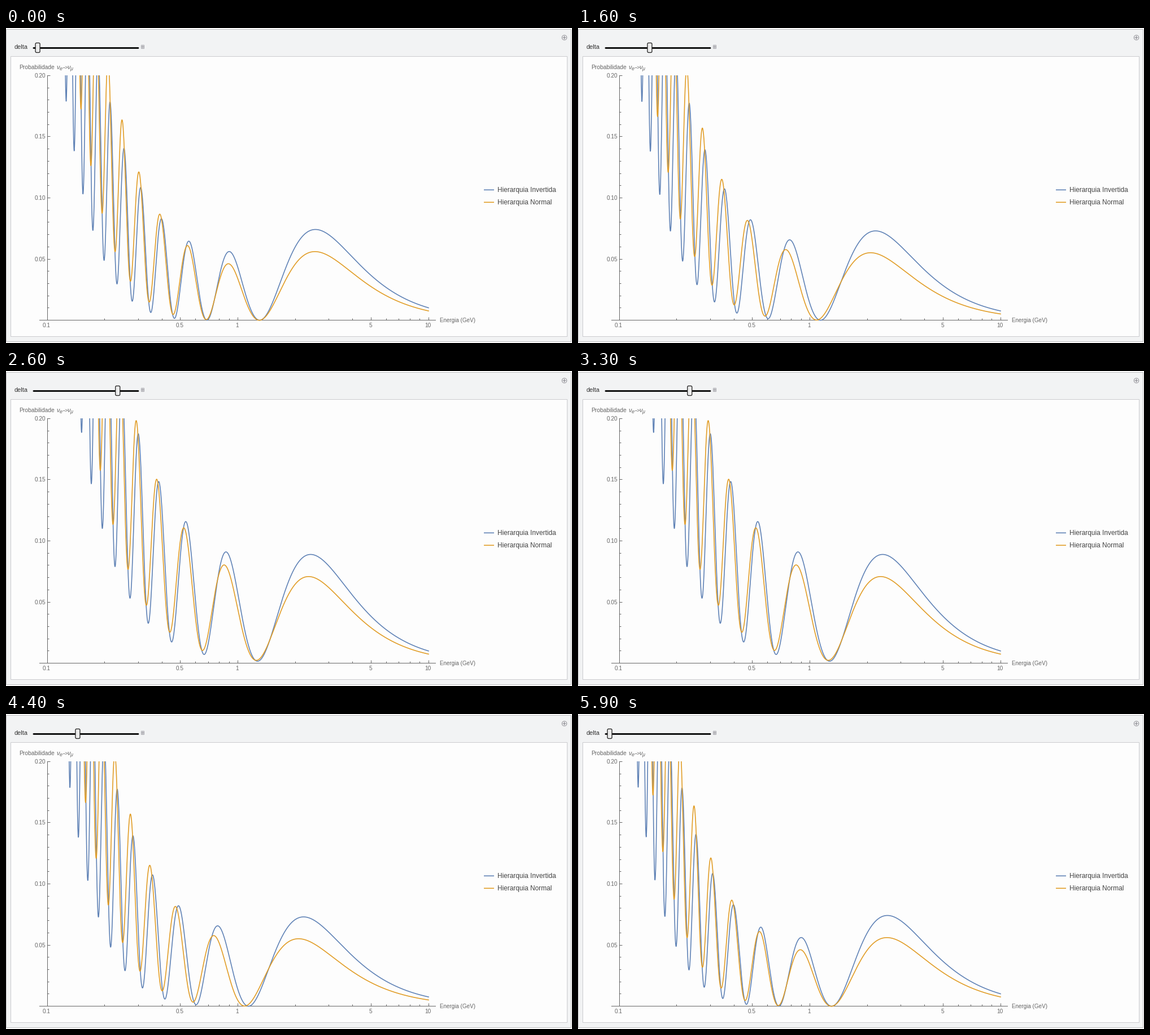
Write a matplotlib script that moves like this. It is 1002 by 559 pixels and loops after 6 s.

```python
import numpy as np
import matplotlib.pyplot as plt
from matplotlib.animation import FuncAnimation
from matplotlib.collections import LineCollection
from matplotlib.patches import Circle, FancyBboxPatch, Rectangle

W, H, DPI = 1002, 559, 64
PT = 72 / DPI                    # points per pixel
FRAMES, INTERVAL = 60, 100
STEPS = 12                       # slider steps of pi/6

X0, DECADE = 73, 337.5           # x of 0.1 GeV, pixels per decade
Y0, YSCALE, TOP = 518.7, 2172, 84
THUMB_X, TRAVEL = 52.1, 170
BLUE, ORANGE, GREY = "#5e81b5", "#e19c24", "#666666"

plt.rcParams["font.family"] = "Liberation Sans"
plt.rcParams["path.snap"] = False
fig = plt.figure(figsize=(W / DPI, H / DPI), dpi=DPI, facecolor="white")
ax = fig.add_axes([0, 0, 1, 1])
ax.set(xlim=(0, W), ylim=(H, 0))
ax.axis("off")


def px(energy):
    return X0 + DECADE * np.log10(energy / 0.1)


def py(prob):
    return Y0 - YSCALE * prob


def crisp(v):
    """Centre of the pixel that holds v."""
    return np.floor(v) + 0.5


def text(x, y, s, size=10, color=GREY, ha="left", va="baseline", **kw):
    ax.text(x, y, s, fontsize=size * PT, color=color, ha=ha, va=va, **kw)


def line(x, y, color, width, **kw):
    return ax.plot(x, y, color=color, lw=width * PT, **kw)[0]


def box(x, y, w, h, face, edge):
    ax.add_patch(Rectangle((x, y), w, h, fc=face, ec=edge, lw=PT))


# Panels
box(0.5, 2.5, 1000, 554, "#f2f3f4", "#bcbcbe")
box(8.5, 50.5, 985, 497, "#fdfdfd", "#cbcbce")

# Slider and small buttons
text(14.6, 37.3, "delta", 11, "#333333")
line([49, 234], [35.5, 35.5], "#111111", 3, solid_capstyle="round")
box(239.5, 30.5, 5, 6, "#f4f4f6", "#a8a8ae")
line([240, 244], [33.5, 33.5], "#8c8c92", 1)
line([242, 242], [31.5, 35.5], "#8c8c92", 1)
ax.add_patch(Circle((988.5, 17), 4.3, fc="#f4f4f6", ec="#99999e", lw=PT))
line([986, 991], [17, 17], "#8c8c92", 1.2)
line([988.5, 988.5], [14.5, 19.5], "#8c8c92", 1.2)

thumb = FancyBboxPatch((THUMB_X, 26.5), 8, 17,
                       boxstyle="round,pad=0,rounding_size=2",
                       fc="#ececec", ec="#222222", lw=1.3 * PT, zorder=4)
ax.add_patch(thumb)

# Axes
left, base = crisp(X0), crisp(Y0)
segs = [[(59, base), (761, base)], [(left, TOP), (left, base)]]
for i in range(1, 21):
    y = crisp(py(i / 100))
    segs.append([(left, y), (left + (5 if i % 5 == 0 else 3), y)])
    if i % 5 == 0:
        text(70, y - 0.3, f"{i / 100:.2f}", ha="right", va="center_baseline")
majors = (0.1, 0.5, 1, 5, 10)
for e in [m * d for d in (0.1, 1) for m in range(1, 10)] + [10]:
    big = any(np.isclose(e, m) for m in majors)
    x = crisp(px(e))
    segs.append([(x, base), (x, base - (5 if big else 3))])
for e in majors:
    text(px(e) - 1, 531.3, f"{e:g}", ha="center")
ax.add_collection(LineCollection(segs, colors=GREY, linewidths=PT))

text(23.4, 73, "Probabilidade", 10.2)
text(89.2, 73, "ν", 11, style="italic")
text(94.4, 75.3, "e", 9, style="italic")
text(99.2, 73, "−>", 9)
text(108.4, 73, "ν", 11, style="italic")
text(113.5, 75.3, "μ", 9, style="italic")
text(767.6, 521.7, "Energia (GeV)", 9.9)

# Legend
for y, color, name in ((287.3, BLUE, "Hierarquia Invertida"),
                       (309.3, ORANGE, "Hierarquia Normal")):
    line([846, 864], [y, y], color, 1.6, solid_capstyle="butt")
    text(870, y + 3.5, name, 11.9, "#444444")

# Oscillation probability with a constant matter term
energy = np.geomspace(0.1, 10, 4000)
MATTER = 1300 / 3500


def probability(atm, sol, phase, delta):
    """atm, sol: amplitudes; phase: oscillation phase at 1 GeV."""
    d = phase / energy
    a = atm * d * np.sinc((d - MATTER) / np.pi)
    b = sol / energy
    return a**2 + 2 * a * b * np.cos(d + delta) + b**2


clip = Rectangle((X0, TOP), 676, Y0 - TOP + 1, transform=ax.transData)
curves = []
for color, params in ((BLUE, (0.221, 0.0710, 4.277)),
                      (ORANGE, (0.192, 0.0811, 4.167))):
    curve = line([], [], color, 1.6, zorder=3)
    curve.set_clip_path(clip)
    curves.append((curve, params))


def draw(n):
    # Rest at zero, step up to 2 pi and back down, rest again
    state = int(np.clip(np.floor(0.48 * (n - 3.6)), 0, 2 * STEPS))
    k = STEPS - abs(STEPS - state)
    thumb.set_x(THUMB_X + TRAVEL * k / STEPS)
    for curve, params in curves:
        prob = probability(*params, 2 * np.pi * k / STEPS)
        curve.set_data(px(energy), py(prob))
    return [thumb] + [c for c, _ in curves]


anim = FuncAnimation(fig, draw, frames=FRAMES, interval=INTERVAL,
                     repeat=True, repeat_delay=0)
plt.show()
```
